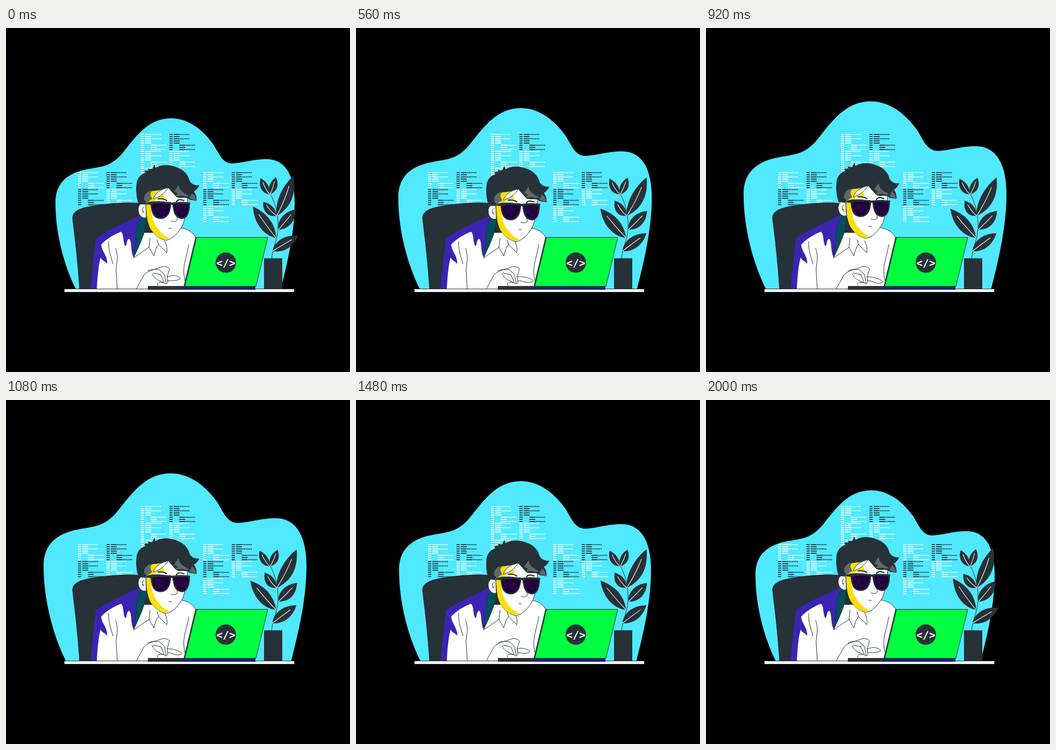
Recreate the animation shown at these times as an HTML page. Size 640 by 640 pixels, loop 2.04 s.

```html
<!DOCTYPE html>
<html lang="en">
<head>
<meta charset="utf-8">
<style>
html, body { margin: 0; width: 100%; height: 100%; overflow: hidden; background: #000; }
svg { display: block; width: 100vw; height: 100vh; }
.dark { fill: #263238; }
.line { fill: none; stroke: #263238; stroke-linecap: round; stroke-linejoin: round; }
.edge { stroke: #263238; stroke-linejoin: round; }
.rib { fill: none; stroke: #fff; stroke-width: 1.1; stroke-linecap: round; }
</style>
</head>
<body>
<svg viewBox="0 0 640 640">
  <path id="blob" fill="#50e9ff" d="M130 486C107 440 92 380 92 325C92 290 112 272 145 264C180 257 192 259 214 236C238 207 262 168 307 168C340 168 367 190 386 217C398 237 403 251 420 252C444 251 458 244 485 244C520 244 537 275 537 325C537 380 524 435 511 486Z"/>
  <g id="code" fill="none" stroke-width="1.8"></g>

  <path class="dark" stroke="#17202a" d="M137 486C134 440 129 395 124 355C123 342 135 335 163 331C195 326 240 322 259 329V486Z"/>

  <g id="plant"><path class="line" d="M494 430C496 408 505 395 506 374C507 350 503 330 491 307"/></g>
  <path class="dark" d="M480 428.500H514V486H480Z"/>

  <!-- jacket and shirt -->
  <path class="edge" fill="#3b24b2" d="M157 486C159 455 163 425 167 391C190 374 220 363 249 348L262 352L255 425L230 486Z"/>
  <path class="edge" fill="#00505c" d="M255 347C246 361 240 378 242 398L237 428L258 408L257 380L263 352Z"/>
  <path fill="#fff" d="M169 486C170 463 172 442 176 427C179 434 184 432 188 439C190 425 178 416 177 403C187 392 201 384 214 379C220 384 217 399 222 406C226 403 223 395 229 392C235 396 231 417 238 427L248 405L257 381L278 381L322 371C337 372 348 380 354 391L336 486Z"/>
  <path class="line" d="M257 381C252 398 244 412 237 428L266 408L275 424C278 413 280 406 284 403L299 418C301 409 298 402 295 396M268 391L266 408M284 403L281 394M325 372C339 374 348 380 354 391M191 397C190 414 196 427 199 439M204 410C211 431 204 438 205 453L207 486M340 403C337 424 329 439 331 459L333 470"/>
  <path class="dark" d="M261 355L257 381H279L274 360Z"/>

  <g id="head">
    <path class="edge" fill="#fff" d="M262 300L302 292L339 308C336 335 334 353 329 366C321 381 311 392 298 395C281 392 268 378 263 357L260 327Z"/>
    <path fill="#ffdf08" d="M264 302L288 297L295 316L279 318L271 335C268 356 283 382 304 391C294 398 279 389 269 374C261 359 261 337 261 325Z"/>
    <path class="edge" fill="#fff" d="M260 329C253 323 246 329 246 338C246 347 252 355 261 353Z"/>
    <path class="line" d="M257 333C251 335 253 342 257 345M254 342L257 341"/>
    <path class="edge dark" d="M247 327C244 318 242 307 243 294C243 281 250 272 260 270L258 266L266 265L264 262L272 263L276 255L278 261C289 253 307 255 318 260C330 264 338 272 341 284C345 291 352 294 359 293C356 299 353 302 349 304C354 311 354 316 354 321L342 319C334 312 326 318 317 314L302 297C290 301 281 302 270 303C265 307 268 314 264 319L258 328Z"/>
    <path fill="#62676a" d="M257 320C256 309 263 303 272 303C266 309 270 314 272 318L262 325ZM313 304L321 292C322 302 330 307 340 312C337 316 333 313 328 312L315 313L320 308ZM341 317L346 307C351 311 354 317 353 321Z"/>
    <path class="edge" fill="#fff" d="M274 318C278 306 288 300 302 297C295 307 286 315 274 318Z"/>
    <path class="line" stroke-width="2.2" d="M317 323C320 318 326 319 331 321M283 318C290 317 295 318 299 321"/>
    <path class="line" d="M310 329C312 344 321 352 318 358C315 361 311 360 307 359M303 372.500L308 373"/>
    <path class="edge" fill="#210039" stroke-width="2.5" d="M270 325H306C306 344 299 355 286 354C274 353 271 342 270 325ZM311 326H341C341 344 336 355 326 354C314 352 312 341 311 326Z"/>
    <g id="glint" fill="none" stroke="#3a1060" stroke-width="1.6"></g>
    <path class="dark" d="M261 325C277 320 296 323 307 325C318 323 333 323 343 325L342 329C331 326 318 326 310 329L305 328C291 325 278 327 271 329L260 328Z"/>
  </g>

  <!-- forearm and hand -->
  <path fill="#fff" d="M242 486L257 459C267 450 280 448 294 443L303 448L302 475L290 480Z"/>
  <path id="finger" class="edge" fill="#fff"/>
  <path class="line" d="M242 486L257 459C266 450 279 449 291 444C298 443 304 446 304 449L300 462L301 473C299 478 295 476 294 473L288 459L274 456M264 452C271 448 281 449 286 450L295 459L298 475M283 479C280 476 282 474 286 473L294 474M272 457C276 468 284 469 292 473"/>

  <!-- desk and laptop -->
  <path class="edge" fill="#fff" d="M108.500 485.500H536.500V491.500H108.500Z"/>
  <path class="edge" fill="#00ff40" d="M354 389.500H487L465 480.500H332Z"/>
  <path class="line" stroke-width="2.6" d="M353.500 390L332 480"/>
  <circle class="dark" cx="409" cy="436.500" r="19"/>
  <text x="409" y="443.500" text-anchor="middle" fill="#fff" font-family="'DejaVu Sans Mono', monospace" font-weight="bold" font-size="20">&lt;/&gt;</text>
  <path class="dark" d="M264 480H332V487H264Z"/>
  <path fill="#172774" d="M331 480.500H464V487H331Z"/>
</svg>
<script>
const $ = id => document.getElementById(id);
const { sin, cos, PI, min } = Math;

function add(parent, attrs, tag = 'path') {
  const el = document.createElementNS('http://www.w3.org/2000/svg', tag);
  for (const key in attrs) el.setAttribute(key, attrs[key]);
  return parent.appendChild(el);
}

// One block of abstract code: dashes, with runs of dots on some rows
function block(x, y) {
  let d = '';
  for (let row = 0; row < 8; row++) {
    const inset = row < 5 ? 8 : 18.5, ry = y + 1.2 + row * 4;
    d += `M${x} ${ry}h6M${x + inset} ${ry}h11`;
    if (row % 5 % 2 === 0 && row !== 4)
      for (let i = 0; i < 6; i++) d += `M${x + inset + 12 + i * 3} ${ry}h2`;
  }
  return d;
}

function cluster(x, y, inks) {
  [...inks].forEach((ink, i) => add($('code'), {
    d: block(x + i % 2 * 53, y + (i >> 1) * 31.5),
    stroke: ink === 'w' ? '#fff' : '#263238'
  }));
}
cluster(134, 268, 'wddw');
cluster(251, 197, 'wdwww');
cluster(367, 268, 'wddww');

for (const x of [277, 315])
  add($('glint'), { d: block(0, 0), transform: `translate(${x} 332) scale(.5)` });

// A leaf from base to tip, bulging by l and r to its sides; it turns about its base
function leaf(x, y, tipX, tipY, l, r, turn) {
  const dx = tipX - x, dy = tipY - y, len = Math.hypot(dx, dy);
  const at = (along, side) => `${x + dx * along - dy / len * side} ${y + dy * along + dx / len * side} `;
  const el = add($('plant'), {}, 'g');
  add(el, { class: 'dark edge', d: `M${at(0, 0)}C${at(.25, -l)}${at(.65, -l)}${at(1, 0)}C${at(.65, r)}${at(.3, r)}${at(0, 0)}Z` });
  add(el, { class: 'rib', d: `M${at(0, 0)}Q${at(.4, (r - l) / 2)}${at(.75, 0)}` });
  return bend => el.setAttribute('transform', `rotate(${turn * bend} ${x} ${y})`);
}
const leaves = [
  leaf(502, 390, 460, 333, 16, 14, -5),
  leaf(504, 349, 534, 276, 12, 18, 5),
  leaf(507, 375, 538, 338, 13, 14, 5),
  leaf(496, 415, 543, 387, 14, 13, -6),
  leaf(503, 349, 479, 324, 13, 8, 6),
  leaf(490, 309, 474, 280, 11, 7, -4),
  leaf(492, 309, 502, 278, 8, 10, 6)
];

function draw(now) {
  const t = Math.floor(now % 2040 / 40) * 40 % 2000;
  const a = t / 1000 * PI, b = 2 * a;

  const size = 1 + .0503 * (1 - cos(a));
  $('blob').setAttribute('transform', `translate(315 486) scale(${size}) translate(-315 -486)`);

  const nod = .5 + 6 * sin(b) - 2.8 * cos(b) + 2.3 * cos(2 * b);
  $('head').setAttribute('transform', `translate(0 ${nod})`);

  // Leaves ease out, rest, and ease back
  const bend = (1 - cos(PI * min(1, t / 600, (2000 - t) / 600))) / 2;
  leaves.forEach(turn => turn(bend));

  const x = 326.6 + 3.2 * sin(a) - 1.6 * cos(a), y = 469 + sin(a) - 3 * cos(a);
  $('finger').setAttribute('d', `M299 463C306 462 ${x - 15} ${y - 8} ${x - 3} ${y - 3}Q${x + 2} ${y} ${x - 3} ${y + 2}C${x - 12} ${y + 5} 310 470 301 470`);
  requestAnimationFrame(draw);
}
requestAnimationFrame(draw);
</script>
</body>
</html>
```
